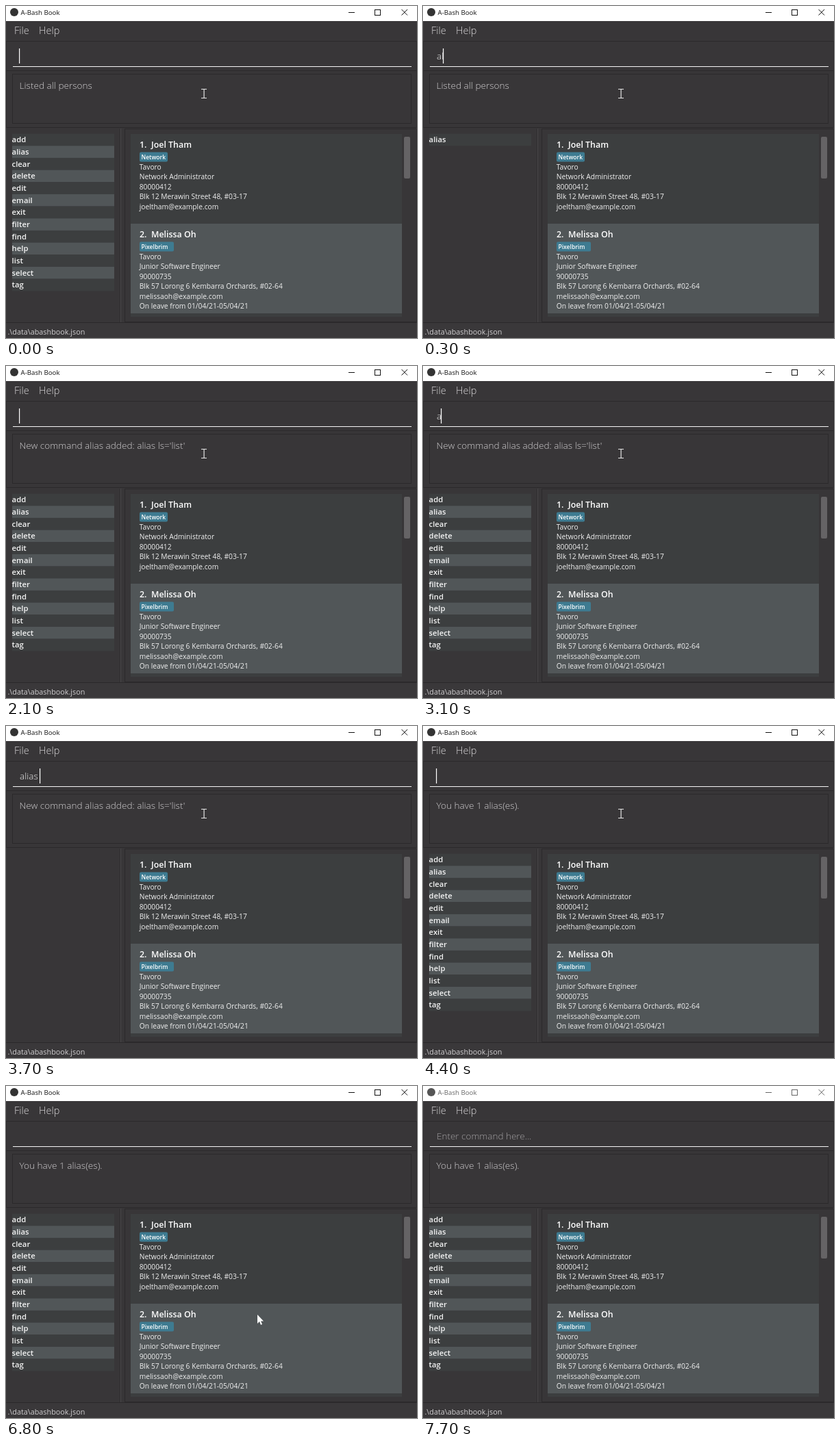
Animation, 600 px wide and 485 px high, one loop 7800 ms. Source, as an HTML page with a canvas:

```html
<!DOCTYPE html>
<html lang="en">
<head>
<meta charset="utf-8">
<title>Address book</title>
<style>
  html, body { margin: 0; width: 100%; height: 100%; overflow: hidden; background: #383638; }
  canvas { display: block; }
</style>
</head>
<body>
<canvas id="stage" width="600" height="485"></canvas>
<script>
const ctx = document.getElementById("stage").getContext("2d");
const LOOP = 7800, STEP = 100, BLUR = 7400;
const BG = "#383638", EDGE = "#2b292b", DARK = "#3c3e3f", LIGHT = "#515658";

const commands = ["add", "alias", "clear", "delete", "edit", "email", "exit",
  "filter", "find", "help", "list", "select", "tag"];

const people = [
  { name: "Joel Tham", tag: "Network", tagWidth: 41, lines: ["Tavoro", "Network Administrator",
    "80000412", "Blk 12 Merawin Street 48, #03-17", "joeltham@example.com"] },
  { name: "Melissa Oh", tag: "Pixelbrim", tagWidth: 50, lines: ["Tavoro", "Junior Software Engineer",
    "90000735", "Blk 57 Lorong 6 Kembarra Orchards, #02-64", "melissaoh@example.com",
    "On leave from 01/04/21-05/04/21"] }
];

// Each entry is typed one key per step, then submitted at its end time.
const entries = [
  { start: 200, end: 2100, bursts: [[200, "alias a"], [900, "dd ls "], [1600, "list"]] },
  { start: 3100, end: 4200, bursts: [[3100, "alia"], [3600, "s ls"]] }
];

function rect(x, y, w, h, color) {
  ctx.fillStyle = color;
  ctx.fillRect(x, y, w, h);
}

function frame(x, y, w, h, color = EDGE) {
  ctx.strokeStyle = color;
  ctx.lineWidth = 1;
  ctx.strokeRect(x + 0.5, y + 0.5, w - 1, h - 1);
}

function text(str, x, y, size, color, weight = 400) {
  ctx.font = `${weight} ${size}px "Open Sans", "Noto Sans", sans-serif`;
  ctx.fillStyle = color;
  ctx.fillText(str, x, y);
  return x + ctx.measureText(str).width;
}

function path(points, color, width) {
  ctx.beginPath();
  points.forEach(([x, y]) => ctx.lineTo(x, y));
  if (width) {
    ctx.strokeStyle = color;
    ctx.lineWidth = width;
    ctx.stroke();
  } else {
    ctx.fillStyle = color;
    ctx.fill();
  }
}

function typedAt(t) {
  const entry = entries.find(e => t >= e.start && t < e.end);
  if (!entry) return "";
  return entry.bursts
    .map(([at, keys]) => keys.slice(0, Math.max(0, Math.floor((t - at) / STEP) + 1)))
    .join("");
}

function titleBar(focused) {
  const ink = focused ? "#111" : "#666";
  rect(0, 0, 600, 22, "#fff");
  ctx.fillStyle = focused ? "#333" : "#555";
  ctx.beginPath();
  ctx.arc(12, 9, 6, 0, 7);
  ctx.fill();
  text("A-Bash Book", 21.5, 13, 9.7, ink);
  rect(500, 9, 9, 1, ink);
  frame(538, 5, 9, 9, ink);
  path([[577.5, 5], [586, 13.5]], ink, 1);
  path([[586, 5], [577.5, 13.5]], ink, 1);
}

function panels() {
  text("File", 12, 41, 14.5, "#dcdadc", 300);
  text("Help", 48, 41, 14.5, "#dcdadc", 300);
  frame(0, 51, 600, 44);
  rect(10, 88, 582, 1, "#f4f4f4");
  frame(0, 94, 600, 84);
  frame(9, 99, 583, 73);
  rect(166, 179, 1, 283, "#302e30");
  rect(167, 179, 1, 283, "#4a484a");
  frame(173, 179, 427, 283);
  rect(0, 462, 600, 1, EDGE);
  rect(0, 463, 600, 22, "#3a383a");
  text(".\\data\\abashbook.json", 2.5, 480, 10.8, "#d0ced0");
}

function commandBox(t, typed) {
  if (t >= BLUR) {
    text("Enter command here...", 20, 77.5, 13.5, "#a3a1a3", 300);
    return;
  }
  const end = text(typed, 20, 77.5, 13.5, "#f0f0f0", 300);
  const blinkFrom = t < 4200 ? 2200 : 4300;
  if (typed || (t - blinkFrom) % 1000 < 500) rect(Math.round(end) - 1, 62, 1.2, 22, "#fff");
}

function commandList(typed) {
  const shown = typed.length < 2 ? commands : commands.filter(c => c.startsWith(typed));
  shown.forEach((name, i) => {
    const y = 186.6 + i * 17.67;
    rect(9, y, 149, 17.67, i % 2 ? LIGHT : DARK);
    text(name, 8.6, y + 12.6, 11.3, "#f4f4f4", 600);
  });
}

function cards() {
  people.forEach((p, i) => {
    const y = 187 + i * 131;
    rect(182, y, 396, 131, i ? LIGHT : DARK);
    text(i + 1 + ".", 195, y + 19.5, 12.4, "#fff", 600);
    text(p.name, 212, y + 19.5, 12.4, "#fff", 600);
    ctx.fillStyle = "#3e7b91";
    ctx.beginPath();
    ctx.roundRect(195, y + 26.5, p.tagWidth, 14, 2);
    ctx.fill();
    text(p.tag, 197.5, y + 36.5, 8.5, "#fff", 600);
    p.lines.forEach((line, n) => text(line, 194.7, y + 52 + n * 14.4, 10.25, "#f0f0f0"));
  });
  rect(182, 449, 396, 5, DARK);
  ctx.fillStyle = "#656365";
  ctx.beginPath();
  ctx.roundRect(581, 191, 9, 61, 2);
  ctx.fill();
}

function pointer(t) {
  if (t >= 7000) return;
  const k = Math.max(0, (t - 6400) / 500);
  const x = 289 + 98 * k, y = 128 + 322 * k * k;
  ctx.save();
  ctx.translate(Math.round(x), Math.round(y));
  if (y < 171) {
    rect(-0.5, -6, 1.2, 13, "#e4e4e4");
    rect(-4, -7, 8, 1, "#e4e4e4");
    rect(-4, 6, 8, 1, "#e4e4e4");
  } else {
    path([[0, 0], [0, 13], [3, 10], [5, 15], [7, 14], [5, 9.5], [9, 9.5]], "#fff");
  }
  ctx.restore();
}

function draw(now) {
  const t = Math.floor(now % LOOP / STEP) * STEP;
  const typed = typedAt(t);
  const message = t < 2100 ? "Listed all persons"
    : t < 4200 ? "New command alias added: alias ls='list'"
    : "You have 1 alias(es).";
  rect(0, 0, 600, 485, BG);
  titleBar(t < BLUR);
  panels();
  commandBox(t, typed);
  text(message, 19.5, 120.5, 13.6, "#d0ced0", 300);
  commandList(typed);
  cards();
  pointer(t);
}

const began = performance.now();
function tick() {
  draw(performance.now() - began);
  requestAnimationFrame(tick);
}
tick();
</script>
</body>
</html>
```
